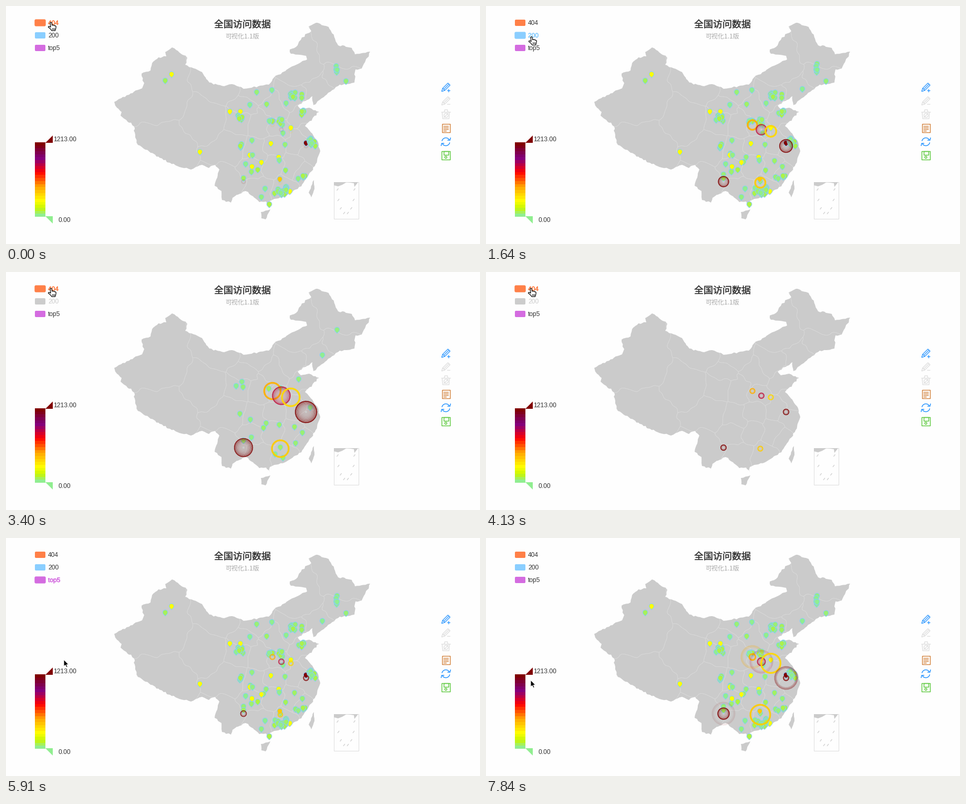
These frames come from a looping animation (902 px wide and 454 px high, 7990 ms). A matplotlib script:

```python
import numpy as np
import matplotlib.pyplot as plt
from matplotlib.animation import FuncAnimation
from matplotlib.collections import LineCollection, PolyCollection
from matplotlib.colors import LinearSegmentedColormap, to_rgba
from matplotlib.patches import FancyBboxPatch, Polygon, Rectangle
from matplotlib.patheffects import withStroke

W, H, DPI = 902, 454, 64
PX = 72 / DPI                      # points per pixel
FRAMES, INTERVAL = 170, 47
STEP, LAST = 148, 53               # ms between picture changes, last change

LAND, BORDER, SKY = "#cbcbcb", "#d9d9d9", "#87cefa"
LATIN, CJK = "Liberation Sans", "Noto Sans CJK JP"
rng = np.random.default_rng(7)

fig = plt.figure(figsize=(W / DPI, H / DPI), dpi=DPI, facecolor="#fefefe")
ax = fig.add_axes([0, 0, 1, 1])
ax.set_xlim(0, W)
ax.set_ylim(H, 0)
ax.axis("off")


def text(x, y, s, size=12, color="#333333", font=LATIN, ha="left", bold=0):
    t = ax.text(x, y, s, fontsize=size * PX, color=color, family=font,
                ha=ha, va="baseline", zorder=6)
    if bold:
        t.set_path_effects([withStroke(linewidth=bold * PX, foreground=color)])
    return t


def shape(pts, color, edge="none", lw=0, z=1):
    p = Polygon(pts, closed=True, fc=color, ec=edge, lw=lw * PX, zorder=z)
    ax.add_patch(p)
    return p


def stroke(color, *lines, lw=1.2, z=5):
    c = LineCollection(lines, colors=color, linewidths=lw * PX, zorder=z)
    ax.add_collection(c)
    return c


def arc(cx, cy, r, a=0, b=360):
    th = np.radians(np.linspace(a, b, 24))
    return np.column_stack([cx + r * np.cos(th), cy + r * np.sin(th)])


def box(x0, y0, x1, y1):
    return [(x0, y0), (x1, y0), (x1, y1), (x0, y1), (x0, y0)]


def coast(pts, amp):
    """Close the key points and break the edges into small seeded wiggles."""
    p = np.array(pts + pts[:1], float)
    out = []
    for a, b in zip(p[:-1], p[1:]):
        n = max(1, int(np.hypot(*(b - a)) / 4))
        for j in range(n):
            out.append(a + (b - a) * j / n + (rng.normal(0, amp, 2) if j else 0))
    return out


# ---- map ----
NORTH = [
    (206, 183), (219, 176), (259, 157), (263, 147), (258, 129), (275, 123),
    (278, 109), (290, 98), (305, 96), (303, 88), (316, 79), (345, 99),
    (341, 112), (373, 126), (387, 146), (415, 153), (430, 149), (452, 158),
    (500, 150), (513, 133), (523, 130), (538, 119), (573, 102), (571, 95),
    (542, 91), (540, 83), (552, 78), (563, 60), (581, 48), (576, 39),
    (590, 32), (614, 40), (632, 75), (658, 80), (664, 92), (693, 87),
    (677, 119), (665, 121), (663, 146), (648, 149)]
SOUTH = [
    (635, 150), (597, 179), (585, 189), (583, 172), (555, 190), (561, 197),
    (577, 194), (596, 202), (569, 229), (577, 237), (594, 260), (598, 277),
    (589, 302), (562, 344), (531, 363), (502, 372), (502, 383), (495, 373),
    (482, 374), (456, 353), (431, 366), (428, 375), (411, 370), (410, 353),
    (397, 343), (406, 312), (398, 303), (386, 309), (373, 303), (352, 312),
    (330, 307), (300, 294), (251, 265), (246, 246), (244, 230), (218, 209),
    (220, 202), (208, 190)]
land = shape(coast(NORTH + SOUTH, .8), LAND)
shape(coast([(485, 393), (503, 388), (494, 407), (486, 405)], .5), LAND)
shape(coast([(586, 332), (587, 349), (581, 365), (576, 356)], .5), LAND)

# provinces: every spot belongs to its nearest centre, on a slightly warped grid
CENTRES = np.array([
    (295, 172), (305, 272), (388, 215), (412, 155), (446, 217), (470, 165),
    (560, 125), (645, 95), (638, 138), (595, 165), (545, 178), (512, 200),
    (482, 222), (456, 195), (560, 208), (522, 235), (578, 245), (553, 258),
    (512, 268), (430, 270), (475, 280), (470, 308), (425, 335), (483, 348),
    (530, 350), (508, 305), (545, 305), (568, 320), (583, 282)])


def province_lines():
    gx, gy = np.meshgrid(np.arange(200, 700, 2), np.arange(30, 400, 2))
    wx = gx + 3 * np.sin(gy / 7) + 2 * np.sin(gx / 4 + gy / 5)
    wy = gy + 3 * np.sin(gx / 8) + 2 * np.cos(gy / 4 - gx / 6)
    dist = np.array([np.hypot(wx - x, wy - y) for x, y in CENTRES])
    lines = []
    for j in range(len(CENTRES)):
        rest = np.delete(dist, j, 0).min(0)
        cs = ax.contour(gx, gy, dist[j] - rest, [0])
        lines += cs.allsegs[0]
        cs.remove()
    return lines


stroke(BORDER, *province_lines(), lw=.7, z=2).set_clip_path(land)

# sea inset
ax.add_patch(Rectangle((623.5, 335.5), 47, 70, fc="none", ec="#dddddd", lw=PX))
shape([(624, 336), (648, 336), (640, 341), (632, 344), (624, 342)], LAND)
shape([(649, 336), (670, 336), (667, 340), (663, 345), (662, 338)], LAND)
for t in np.linspace(0, np.pi, 8):
    x, y = 647 - 16 * np.cos(t), 350 + 46 * np.sin(t)
    stroke("#cccccc", [(x - 1.5, y + 2), (x + 1.5, y - 2)])

# ---- title, scale ----
text(450, 41, "全国访问数据", 18, "#333333", CJK, "center", .25)
text(450, 61.5, "可视化1.1版", 12, "#aaaaaa", CJK, "center")

heat = LinearSegmentedColormap.from_list("heat", [
    (0, "lightgreen"), (.1, "#c8f500"), (.2, "yellow"), (.4, "orange"),
    (.6, "red"), (.8, "purple"), (1, "maroon")])
BANDS = 25
for j in range(BANDS):
    ax.add_patch(Rectangle((55, 260 + 142 * j / BANDS), 20, 142 / BANDS, aa=False,
                           fc=heat(1 - j / (BANDS - 1)), ec="none"))
shape([(75, 261), (89, 247), (89, 261)], "maroon")
shape([(75, 401), (89, 401), (89, 415)], "lightgreen")
text(90, 258, "1213.00")
text(100, 412, "0.00")

# ---- toolbox ----
BLUE, PALE, BROWN, GREEN = "#1e90ff", "#dcdcdc", "#d2813c", "#5bc83c"


def pencil(y, color, plus):
    stroke(color,
           [(829, y + 8), (831, y + 2), (841, y - 8), (845, y - 4), (835, y + 6), (829, y + 8)],
           [(831, y + 2), (835, y + 6)], [(833, y + 4), (843, y - 6)],
           [(839, y + 6), (845, y + 6)])
    if plus:
        stroke(color, [(842, y + 3), (842, y + 9)])


pencil(155, BLUE, True)
pencil(181, PALE, False)
stroke(PALE, [(830, 203), (831, 215), (843, 215), (844, 203)], [(828, 202), (846, 202)],
       [(834, 202), (835, 198), (840, 198), (841, 202)], [(833, 213), (842, 204)],
       arc(837.5, 208.5, 4))
stroke(BROWN, box(829.5, 225, 844.5, 241), [(832, 238), (838, 238)],
       *([(832, y), (842, y)] for y in (229, 232, 235)), lw=1.4)
stroke(BLUE, arc(837, 259, 7.5, 190, 335), arc(837, 259, 7.5, 10, 155),
       [(840, 256), (845, 256), (846, 251)], [(828, 267), (829, 262), (834, 262)], lw=1.4)
stroke(GREEN, box(829, 277, 845, 293), box(832.5, 277, 841.5, 283.5),
       arc(837, 288.5, 2), lw=1.4)

# ---- pins ----
PIN = np.vstack([arc(0, 0, 4.8, 140, 400), [(0, 7)]])
SINGLES = [(303, 142), (647, 143), (477, 164), (506, 160), (464, 188), (496, 187),
           (533, 185), (468, 256), (531, 264), (527, 242), (456, 301), (479, 312),
           (467, 316), (469, 284), (532, 313), (493, 348), (486, 364), (501, 378),
           (511, 357), (452, 328), (520, 294)]
# x, y, half width, half height, count
CLUSTERS = [(629, 120, 3, 12, 4), (546, 170, 5, 6, 9), (563, 171, 1, 4, 2),
            (563, 205, 5, 6, 6), (583, 260, 7, 8, 12), (562, 326, 8, 3, 4),
            (525, 352, 9, 8, 15), (446, 213, 6, 5, 9), (524, 222, 5, 8, 7),
            (503, 222, 4, 5, 3), (446, 266, 2, 3, 4)]
GOLD = [(315, 130), (426, 201), (446, 201), (369, 278), (504, 262), (464, 284),
        (468, 306), (486, 298), (519, 288), (540, 353), (542, 232)]
MISSES = [(630, 110), (602, 158), (557, 204), (449, 209), (438, 217), (451, 219),
          (500, 222), (522, 221), (445, 270), (465, 281), (495, 288), (490, 297),
          (520, 291), (549, 295), (564, 306), (467, 315), (452, 321), (551, 326),
          (512, 347), (527, 354), (522, 334), (579, 258)]


def scatter(cx, cy, sx, sy, n):
    return [(cx + a * sx, cy + b * sy) for a, b in rng.uniform(-1, 1, (n, 2))]


def pins(spots, heats, z):
    c = PolyCollection([PIN + p for p in spots], facecolors=heat(heats),
                       edgecolors=SKY, linewidths=PX, zorder=z)
    ax.add_collection(c)
    return c


miss_pins = pins(MISSES, rng.uniform(0, .04, len(MISSES)), 3)
green = SINGLES + [p for c in CLUSTERS for p in scatter(*c)]
hot = [(571, 261), (508, 219), (521, 330)]
hit_pins = pins(hot + GOLD + green,
                np.r_[1, .48, .32, np.full(len(GOLD), .21), rng.uniform(0, .06, len(green))], 4)

# ---- legend ----
ITEMS = [("404", "#ff8048"), ("200", "#8aceff"), ("top5", "#d46ce0")]
legend = []
for j, (name, color) in enumerate(ITEMS):
    y = 26 + 24 * j
    patch = FancyBboxPatch((56.5, y + 1.5), 17, 9, lw=0, zorder=5,
                           boxstyle="round,pad=1.5,rounding_size=2")
    ax.add_patch(patch)
    legend.append((patch, text(80, y + 10, name), color))

# (step, legend row): each click toggles a row and restarts the pulses
CLICKS = [(0, 0), (6, 0), (13, 1), (27, 0), (30, 0), (34, 1), (36, 2), (39.1, 2)]

# ---- pulses: x, y, colour, inner glow, growth in px/s at first and last restart ----
PULSES = [(507, 227, "#ffb000", False, 7.5, 10.6), (524, 236, "#c00c38", True, 8, 11.4),
          (542, 239, "#ffd800", False, 10, 7.4), (571, 267, "#800000", True, 12, 9.8),
          (452, 335, "#800000", True, 7.5, 13.6), (522, 337, "#ffcc00", False, 9, 7.6)]
R0, R1 = 3.7, 22
ring_art = stroke("black", z=7)


def pulse_rings(k):
    run = sum(s <= k for s, _ in CLICKS) - 1
    dt = (k - CLICKS[run][0]) * STEP / 1000
    rings = []
    for x, y, color, glow, first, last in PULSES:
        v = first + (last - first) * run / (len(CLICKS) - 1)
        el = dt
        if el > (R1 - R0) / v:           # later rounds are slower and leave a fading ghost
            el -= (R1 - R0) / v
            v *= .75
            el %= (R1 - R0) / v
            ghost = np.exp(-el / .35)
            rings += [(x, y, R1 - d, color, ghost * (.6 - .1 * d), 1.3) for d in range(5)]
        r = R0 + v * el
        fresh = min(1, .12 + el * 6)
        if glow:
            rings += [(x, y, q, color, fresh * (.1 + .6 * (q / r) ** 3), 1)
                      for q in np.arange(R0 - 1, r - .5, 1.2)]
            rings.append((x, y, r, color, .9 * fresh, 1.6))
        else:
            rings.append((x, y, r - 2, color, .3 * fresh, 1.5))
            rings.append((x, y, r - .3, color, .95 * fresh, min(3, 1.4 + 3 * el)))
    return rings


# ---- cursor ----
HAND = np.array([(0, 1), (1.5, 0), (3, 1), (3.6, 6), (5, 5), (6.5, 6), (8, 5.6), (9, 7),
                 (10.5, 6.8), (11.3, 8.5), (10.5, 13), (9.5, 16), (3, 16), (.5, 12.5),
                 (-3.5, 9.5), (-3, 7.8), (-1, 8), (1, 9.5)])
ARROW = np.array([(0, 0), (0, 13), (3, 10.4), (5.2, 15), (7.2, 14), (5.2, 9.6), (9, 9.3)])
LEAVE = 40                         # step at which the pointer has left the legend
ROW_KEYS = [(6, 0), (8, 1), (20, 1), (22, 0), (32, 0), (33, 1), (35, 1), (36, 2)]
ARROW_KEYS = [(40, 110, 232), (46, 108, 404), (47, 104, 470), (48, 96, 470), (53, 85, 271)]
hand = shape(HAND, "white", "black", 1.2, 9)
fingers = stroke("black", lw=1, z=10)
arrow = shape(ARROW, "black", "white", 1, 9)


def glide(k, keys):
    steps, *tracks = zip(*keys)
    return np.array([np.interp(k, steps, t) for t in tracks])


def draw_cursor(k, row):
    over = k < LEAVE
    hand.set_visible(over)
    fingers.set_visible(over)
    arrow.set_visible(not over)
    pos = np.array([84 + row, 31 + 27.5 * row])
    hand.set_xy(HAND + pos)
    fingers.set_segments([np.array([(x, 10.5), (x, 13.5)]) + pos for x in (3.5, 5.8, 8)])
    arrow.set_xy(ARROW + glide(k, ARROW_KEYS))


def update(i):
    k = min(int((i * INTERVAL + 56) / STEP), LAST)
    on = [sum(s <= k and r == j for s, r in CLICKS) % 2 == 0 for j in range(len(ITEMS))]
    miss_pins.set_visible(on[0])
    hit_pins.set_visible(on[1])

    rings = pulse_rings(k) if on[2] else []
    ring_art.set_segments([arc(*g[:3]) for g in rings])
    ring_art.set_color([to_rgba(g[3], g[4]) for g in rings])
    ring_art.set_linewidth([g[5] * PX for g in rings] or [1])

    row = glide(k, ROW_KEYS)[0]
    hover = round(row) if k <= LEAVE else None
    for j, (patch, label, color) in enumerate(legend):
        lit = hover == j
        patch.set_color(color if on[j] or lit else "#cccccc")
        patch.set_linewidth(1.3 * PX if lit else 0)
        label.set_color(color if lit else "#333333" if on[j] else "#cccccc")
        label.set_path_effects([withStroke(linewidth=.6 * PX, foreground=color)] if lit else [])
    draw_cursor(k, row)
    return []


anim = FuncAnimation(fig, update, frames=FRAMES, interval=INTERVAL,
                     init_func=lambda: update(0), repeat=True, repeat_delay=0)
plt.show()
```
